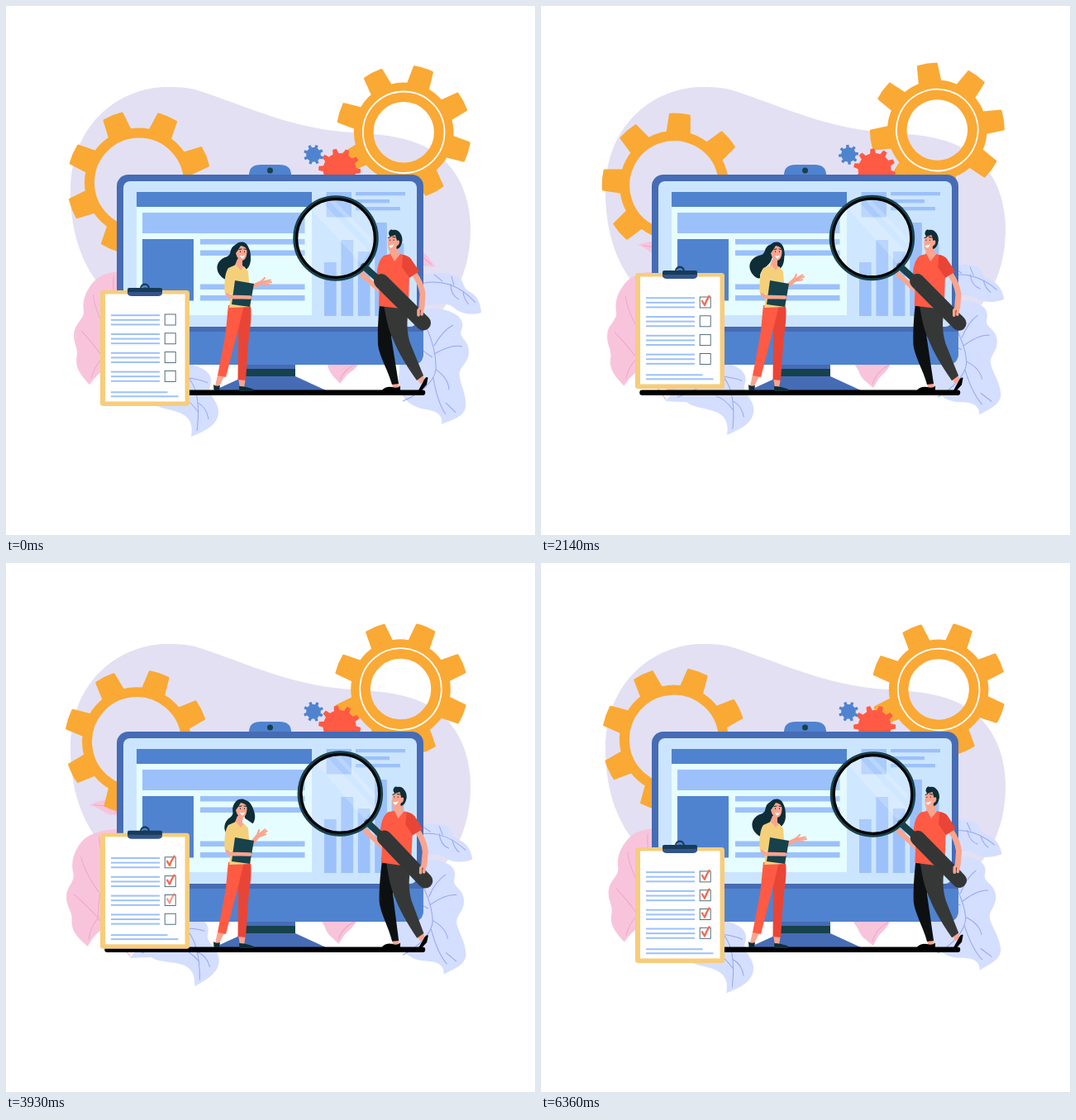
An HTML page for the animation above (6.43 s loop, 640 px wide and 640 px high).

```html
<!DOCTYPE html>
<html lang="en">
<head>
<meta charset="utf-8">
<title>Checklist review</title>
<style>
html, body { margin: 0; width: 100%; height: 100%; overflow: hidden; background: #fff; }
svg { display: block; width: 100vw; height: 100vh; }
.navy { fill: #466cb5; } .blue { fill: #5083cf; } .sky { fill: #9cc1fa; }
.amber { fill: #faa935; stroke: #faa935; stroke-width: 3; stroke-linejoin: round; }
.red { fill: #ff5a44; } .brick { fill: #e94537; } .skin { fill: #f9a58f; }
.dark { fill: #0e2d36; } .teal { fill: #17414b; } .butter { fill: #f5d07b; }
.pink { fill: #f8c4dc; } .ice { fill: #d4deff; }
.line { fill: none; stroke-linecap: round; stroke-linejoin: round; }
.limb { fill: none; stroke: #f9a58f; stroke-linecap: round; stroke-linejoin: round; }
.pinkVein { fill: none; stroke: #efa6c9; } .iceVein { fill: none; stroke: #93a6f2; }
</style>
</head>
<body>
<svg viewBox="0 0 640 640">
  <path fill="#e3e0f3" d="M78 225C78 140 140 98 195 98C212 98 224 99 235 103C290 121 350 150 420 153C450 155 476 157 500 167C545 186 562 228 562 270C562 312 548 350 520 375H160C110 350 78 300 78 225Z"/>

  <g id="leftPlant">
    <path class="pink" d="M133 325C104 324 78 334 70 348C62 362 61 376 66 387C70 396 61 404 62 415C63 428 72 432 73 443C74 458 86 465 97 472C101 462 104 454 114 447L160 470L150 330Z"/>
    <path class="pinkVein" d="M122 330C104 365 98 400 104 436L150 476M100 405Q80 385 72 366M104 436Q84 420 70 412M104 376Q92 352 90 338M104 436Q96 450 97 464"/>
    <path class="pink" d="M72 303C84 293 102 289 120 294L134 298L140 330L128 322C122 312 114 308 103 310C93 312 86 303 72 303Z"/>
    <path class="pinkVein" d="M78 302Q115 296 132 326M100 300L94 294M108 301L104 308"/>
    <g transform="rotate(-15.5 150 480)">
      <path class="ice" d="M150 478L205 425L228 435C246 440 251 450 247 460C243 470 257 477 257 491C257 508 238 515 224 521C226 508 224 499 212 493C198 487 186 488 176 480Z"/>
      <path class="iceVein" d="M165 474C190 464 210 455 221 450C231 462 235 482 231 514M221 450Q236 452 244 456M232 480Q243 486 245 500M233 492Q222 476 212 474"/>
    </g>
  </g>

  <g id="rightPlant">
    <path class="pink" d="M385 425H432C425 440 416 442 411 448L404 457C400 451 391 446 389 434Z"/>
    <path class="pinkVein" d="M426 432Q410 438 404 452"/>
    <path class="pink" d="M495 292C505 298 509 300 512 305C514 310 518 311 519 316C511 314 506 316 495 310Z"/>
    <path class="pinkVein" d="M500 300L515 313"/>
    <path class="ice" d="M495 328C512 322 530 321 544 326C556 331 551 340 560 345C569 350 574 357 575 371C565 374 551 373 543 366C532 356 520 362 500 363Z"/>
    <path class="iceVein" d="M496 337C527 329 549 338 568 359M528 333L518 325M542 338L539 327M538 336Q538 350 548 355M553 345Q554 355 560 361"/>
    <path class="ice" d="M480 385C494 368 512 363 532 368C550 373 555 382 551 392C547 402 560 404 560 418C560 434 546 436 549 449C551 461 557 470 556 485C554 498 538 501 527 506C529 494 520 490 508 488C492 486 482 478 474 462Z"/>
    <path class="iceVein" d="M480 478C500 470 518 455 520 440C521 420 515 400 503 378M518 421Q539 409 552 412M518 411Q528 393 541 386M520 440Q535 450 536 464M517 450Q522 480 532 494M532 480L544 492M516 425Q500 415 492 404"/>
  </g>

  <g id="bigLeft"></g>
  <g id="bigRight"></g>
  <g id="smallRed"></g>
  <g id="smallBlue"></g>

  <path class="blue" d="M294 205V203Q295 192 308 192H331Q344 192 345 203V205Z"/>
  <circle class="teal" cx="319.5" cy="199" r="3.5"/>
  <path class="navy" d="M289 433H350V448L387 465H252L289 448Z"/>
  <rect class="teal" x="289" y="439" width="61" height="9"/>
  <rect class="navy" x="134" y="204" width="371" height="230" rx="14"/>
  <path class="blue" d="M134 394H505V420Q505 434 491 434H148Q134 434 134 420Z"/>
  <rect x="142" y="212" width="355" height="176" rx="8" fill="#cce5ff"/>
  <rect x="158" y="242" width="212" height="132" fill="#e6fdff"/>
  <rect class="blue" x="158" y="225" width="212" height="18"/>
  <rect class="blue" x="165" y="282" width="62" height="74.5"/>
  <g id="page"></g>
  <path class="line" stroke="#000" stroke-width="6.5" d="M122.500 467.800H504"/>

  <g id="clipboard">
    <rect x="114" y="344" width="108" height="140" rx="3.500" fill="#f6cd7c"/>
    <rect x="120" y="348.500" width="96.500" height="130" fill="#fff"/>
    <g id="rows"></g>
    <circle class="line" stroke="#173b58" stroke-width="2.300" cx="168" cy="341.500" r="4.800"/>
    <path fill="#34548c" d="M147 344H189V348Q188 351 184 351H152Q148 351 147 348Z"/>
    <path fill="#173b58" d="M149 341H187Q189 341 189 343V346H147V343Q147 341 149 341Z"/>
    <path class="line" stroke="#173b58" stroke-width="2" d="M163.500 345Q168 338 172.500 345"/>
  </g>

  <g id="woman">
    <g id="hair">
      <path class="dark" d="M279 288C267 294 276 301 265 304C255 308 252 319 260 327C264 331 267 332 270 331C267 322 276 318 280 310L285 292Z"/>
      <path class="dark" d="M286 288C296 290 296 299 296 306C296 314 292 318 290 319L283 310Z"/>
    </g>
    <path class="skin" d="M281 450H290L288 462H283ZM256 446L264 448L258 460H253Z"/>
    <path class="dark" d="M251 458Q254 461 259 459L258 465H251.500ZM282 460Q290 460 300 464L299 466H282.500Z"/>
    <path class="brick" d="M280 362H296C298 380 294 395 293 410L290 453L280.500 452L281 400Z"/>
    <path class="red" d="M269 362H288C284 378 280 396 276 410L266 449L256 447L264 405C267 390 267 378 269 362Z"/>
    <path class="skin" d="M280 306H286V314L290 318L283 321L276 316Z"/>
    <path class="butter" d="M269 317L278 313L284 320L288 315L293 321L294 334L296 364L270 365L273 344L264.500 346C264 334 265 322 269 317Z"/>
    <g id="hand">
      <path class="limb" stroke-width="5" d="M297 340L309 334.500"/>
      <path class="limb" stroke-width="2.200" d="M308 334L313 329M309 334L320 331.500M309 335L321 334M310 336L318 337"/>
    </g>
    <path class="teal" d="M277 332L300 336L295 364L273 361Z"/>
    <path class="limb" stroke-width="4.500" d="M267.500 348Q270 353 277 352L295 352.500"/>
    <path class="butter" d="M265 340H274L273 348L265 347Z"/>
    <path class="dark" d="M275 295Q277 285 286 285.500Q295 287 294.500 302H284L277 301Z"/>
    <path class="skin" d="M278 299Q281 295 284 290Q292 291 291.500 298Q291 307 286 308Q280 308 278 299Z"/>
    <path class="line" stroke="#0e2d36" d="M282 294.500L285 294M288 294L290.500 294.500M283.500 297V297.500M288.500 297V297.500"/>
    <path fill="#fff" d="M282.500 302Q286 303 289 301.500Q288 305.500 285.500 305.500Z"/>
  </g>

  <g id="man">
    <path class="skin" d="M467 455H475V463H468ZM497 450L504 446L507 453L501 457Z"/>
    <path d="M455 465Q459 460 467 461Q474 463 477 459.500V466H456ZM499 465L506 452Q508 448 510.500 449.500L509 458L502 466L498 468Z"/>
    <path fill="#0d1011" d="M452 360L470 364L466 400L475 457L467 458C462 440 452 425 450 410Q449 390 452 360Z"/>
    <path fill="#363838" d="M457 361L488 364C484 380 485 395 489 408Q498 430 505 447L497 453Q477 425 469 405C462 390 460 378 457 361Z"/>
    <path class="skin" d="M466 290H475V301L481 306L470 312L463 302Z"/>
    <path class="limb" stroke-width="6" d="M451 343L431 325"/>
    <path class="red" d="M457 302L465 300L470 309L477 300L484 302L488 320L487 367L451 363C451 350 453 340 449 335C448 320 450 308 457 302Z"/>
    <path class="limb" stroke-width="7" d="M494 324Q502 335 504 348L503 364"/>
    <path class="brick" d="M480 301Q487 302 490 306L500 321L488 329L479 316Z"/>
    <path class="dark" d="M463 276C463 270 467 270 468 271C474 269 480 276 479.500 284Q478 293 473 294L469 287Z"/>
    <path class="skin" d="M462.500 280L471 277L473 284Q476 282 476 286Q475 290 473 290Q471 299 465 297Q461 295 462.500 280Z"/>
    <path class="line" stroke="#0e2d36" d="M462.500 280.500L465 279.500M468 279.500L471 280M464.500 283V283.500M469 283V283.500"/>
    <path fill="#fff" d="M463 289.500Q466 290.500 469.500 288Q468 293 465 292.500Z"/>
    <path class="line" stroke="#17414b" stroke-width="8" stroke-linecap="butt" d="M433 315L452 332"/>
    <path class="line" stroke="#343636" stroke-width="18" d="M454 333L505 383.500"/>
    <circle cx="399" cy="281" r="47" fill="#dceeff" fill-opacity=".22"/>
    <path fill="#fff" fill-opacity=".2" d="M370 247L383 238L440 297L430 312ZM391 236L397 235L442 281L441 288Z"/>
    <circle class="line" cx="399" cy="281" r="49.500" stroke="#17414b" stroke-width="4.500"/>
    <circle class="line" cx="399" cy="281" r="47.300" stroke="#000" stroke-width="3.200"/>
    <path class="limb" stroke-width="3.500" d="M503 363L499 368V374M504 365L503 373"/>
  </g>
</svg>
<script>
const LOOP = 6430, STEPS = 90;
const el = id => document.getElementById(id);
const set = (id, transform) => el(id).setAttribute('transform', transform);
const clamp = x => Math.min(1, Math.max(0, x));
const range = n => [...Array(n).keys()];
const rect = (x, y, w, h) => `<rect class="sky" x="${x}" y="${y}" width="${w}" height="${h}"/>`;

// Gear outline: tapered teeth on a disc, with an optional hole.
function gear(cls, cx, cy, tip, root, teeth, phase, halfTip, halfRoot, hole = 0) {
  const at = (r, deg) => {
    const a = deg * Math.PI / 180;
    return `${(cx + r * Math.cos(a)).toFixed(2)} ${(cy + r * Math.sin(a)).toFixed(2)}`;
  };
  const arc = r => `A${r} ${r} 0 0 1 `;
  let d = `M${at(root, phase - halfRoot)}`;
  for (const i of range(teeth)) {
    const a = phase + i * 360 / teeth;
    d += `L${at(tip, a - halfTip)}${arc(tip)}${at(tip, a + halfTip)}L${at(root, a + halfRoot)}`
       + arc(root) + at(root, a + 360 / teeth - halfRoot);
  }
  d += 'Z';
  if (hole) d += `M${at(hole, 0)}${arc(hole)}${at(hole, 180)}${arc(hole)}${at(hole, 360)}Z`;
  return `<path class="${cls}" fill-rule="evenodd" d="${d}"/>`;
}

el('bigLeft').innerHTML = gear('amber', 161, 213.6, 86, 64.5, 8, -66.5, 7.7, 11.8, 55.5);
el('bigRight').innerHTML = gear('amber', 481.2, 152.8, 80, 58.8, 8, -72.7, 8, 12.2, 38.2)
  + '<circle cx="481.2" cy="152.8" r="49.3" fill="none" stroke="#fff" stroke-width="1.8"/>';
el('smallRed').innerHTML = gear('red', 403.6, 198, 25.5, 20, 10, -104, 5.5, 10);
el('smallBlue').innerHTML = gear('blue', 372, 179.8, 12, 8.8, 8, -70, 8, 12);

const textLines = [282, 295.5, 336.5, 350].map(y => rect(235, y, 126.5, 6.5));
const legend = [60, 41, 54].map((w, i) => rect(423, 225 + 9 * i, w, 4.3));
const bars = [65, 92, 78, 113, 88].map((h, i) => rect(385 + 20.4 * i, 375 - h, 14.7, h));
el('page').innerHTML = [rect(165, 250, 196.5, 25), rect(387.5, 225, 30.5, 30.5),
  ...textLines, ...legend, ...bars].join('');

el('rows').innerHTML = range(4).map(i => {
  const y = 373 + i * 22.8;
  return range(3).map(k => rect(127, y + .2 + k * 5.6, 59, 2)).join('')
    + `<rect x="192.2" y="${y}" width="13" height="13" fill="#fff" stroke="#3f5f6d" stroke-width=".9"/>`
    + `<path id="tick${i}" class="line" stroke="#f2694f" stroke-width="2.3" d="M195 ${y + 5}L198 ${y + 10}Q200 ${y + 4} 203.500 ${y - 1}"/>`;
}).join('') + rect(127, 466.3, 68.5, 2) + rect(127, 471.3, 81.5, 2);

// Eased rise from 0 to 1 at the peak, then an eased fall back to 0.
const ease = u => (1 - Math.cos(Math.PI * clamp(u))) / 2;
const pulse = (t, from, peak, to) =>
  t < peak ? ease((t - from) / (peak - from)) : ease((to - t) / (to - peak));

const boardLift = t => pulse(t, 0, 1550, 3215) + pulse(t, 3215, 4430, LOOP);
const manLean = t => pulse(t, 0, 930, 2300) + pulse(t, 3500, 4800, 6800);
const leftSway = t => pulse(t, 0, 770, 2400) + pulse(t, 2550, 3300, 4450) + pulse(t, 4800, 5660, LOOP);
const rightSway = t => pulse(t, -1290, 760, 1600) + pulse(t, 1750, 3300, 4250) + pulse(t, 4250, 5150, 6360);
const hairSwing = t => pulse(t, 1400, 3850, 5900)
  + .4 * (pulse(t, -1600, 0, 1600) + pulse(t, 4800, LOOP, 8000));
const handWave = t => pulse(t, 0, 1570, 2700) + pulse(t, 3150, 4100, 6000);

function draw(t) {
  const turn = 360 * t / LOOP;
  set('bigLeft', `rotate(${turn} 160 215.4)`);
  set('bigRight', `rotate(${-turn} 479.4 152)`);
  set('smallRed', `rotate(${turn} 403.6 198)`);
  set('smallBlue', `rotate(${-turn} 372 179.8)`);
  set('leftPlant', `rotate(${15.5 * (1 - leftSway(t))} 150 480)`);
  set('rightPlant', `rotate(${12.5 * (rightSway(t) - .7)} 442 475)`);
  set('clipboard', `translate(0 ${-27 * boardLift(t)})`);
  set('man', `rotate(${6.8 * manLean(t)} 473 463)`);
  set('hair', `rotate(${30 * (.4 - hairSwing(t))} 282 290)`);
  set('hand', `rotate(${-28 * handWave(t)} 297 341)`);
  for (const i of range(4)) {
    el('tick' + i).setAttribute('opacity', clamp((t - (i + 1) * LOOP / 5) / 110));
  }
}

const start = performance.now();
function frame() {
  const t = (performance.now() - start) % LOOP;
  draw(Math.floor((t + 2) / LOOP * STEPS) % STEPS / STEPS * LOOP);
  requestAnimationFrame(frame);
}
frame();
</script>
</body>
</html>
```
